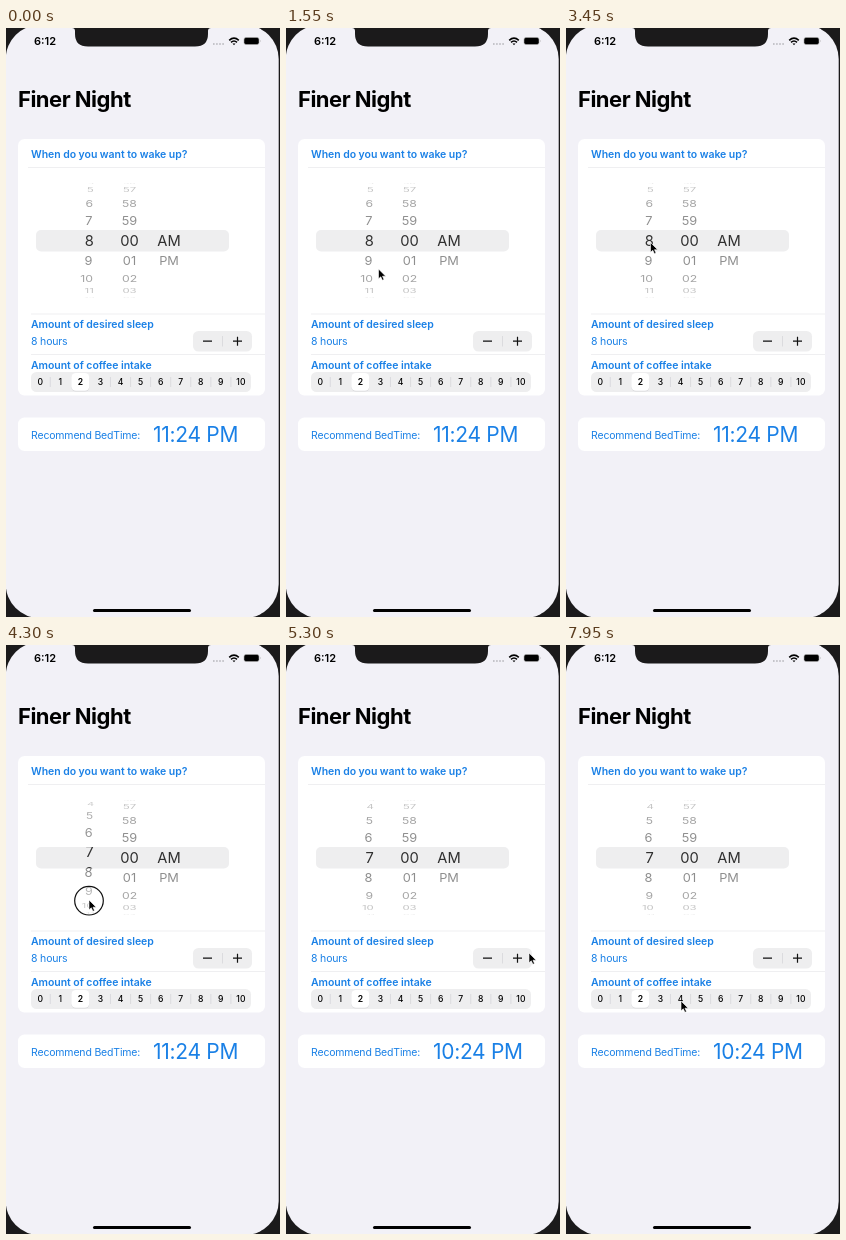
Write an HTML page that moves like this. It is 274 px wide and 589 px high and loops after 8 s.

```html
<!DOCTYPE html>
<html lang="en">
<head>
<meta charset="utf-8">
<title>Bedtime calculator</title>
<style>
html, body { margin: 0; width: 100%; height: 100%; overflow: hidden; background: #1b1a1b; }
svg { display: block; width: 274px; height: 589px; font-family: Inter, "Noto Sans", sans-serif; }
.blue { fill: #1a80e6; font-size: 10.5px; letter-spacing: -.17px; }
.bold { font-weight: 600; letter-spacing: -.05px; }
.time { font-size: 21px; letter-spacing: -.3px; }
.card { fill: #fff; }
.grey { fill: #eeeeef; }
.line { stroke: #ebebee; stroke-width: .8; }
.tick { stroke: #d6d6da; stroke-width: .8; }
</style>
</head>
<body>
<svg viewBox="0 0 274 589">
  <defs>
    <clipPath id="inside"><path d="M30 202H223V223.5H30Z"/></clipPath>
    <clipPath id="outside"><path d="M30 155H223V202H30ZM30 223.5H223V270H30Z"/></clipPath>
  </defs>
  <rect x="-.3" y="-3" width="273" height="593" rx="34" fill="#f2f1f7"/>
  <path d="M66 0Q69 0 69 3V6Q69 18.500 82 18.500H189Q202 18.500 202 6V3Q202 0 205 0Z" fill="#1b1a1b"/>

  <text x="28" y="17" font-size="11" font-weight="600">6:12</text>
  <path d="M207 16h11" stroke="#b5b5ba" stroke-width="1.6" stroke-dasharray="1.6 1.5"/>
  <path d="M223.200 12.300Q228 8 232.800 12.300M225 14.300Q228 11.700 231 14.300" fill="none" stroke="#000" stroke-width="1.6"/>
  <path d="M226.500 15.500h3L228 17.200Z"/>
  <rect x="238" y="9.500" width="15" height="7" rx="2" stroke="#aaa" stroke-width=".6"/>
  <path d="M254 11.700q1.300 1.300 0 2.600Z" fill="#aaa"/>

  <text x="12" y="79" font-size="22" font-weight="700" letter-spacing="-.5">Finer Night</text>

  <rect class="card" x="12" y="111" width="247" height="256.500" rx="6.500"/>
  <path class="line" d="M22 139.500H259M25 286H259M25 326.500H259"/>
  <text class="blue bold" x="25" y="129.500">When do you want to wake up?</text>
  <rect class="grey" x="30" y="202" width="193" height="21.500" rx="5"/>
  <g id="wheel"></g>

  <text class="blue bold" x="25" y="300">Amount of desired sleep</text>
  <text class="blue" x="25" y="317">8 hours</text>
  <rect class="grey" x="187" y="303" width="59" height="20.500" rx="5.500"/>
  <path class="tick" d="M216.500 308v10.500"/>
  <path d="M197 313.200h9M227 313.200h9M231.500 308.700v9" stroke="#111" stroke-width="1.2"/>

  <text class="blue bold" x="25" y="341">Amount of coffee intake</text>
  <rect class="grey" x="25" y="344" width="220" height="20" rx="5.500"/>
  <g id="segments" font-size="8.600" text-anchor="middle"></g>

  <rect class="card" x="12" y="389.500" width="247" height="33.500" rx="6.500"/>
  <text class="blue" x="25" y="410.500">Recommend BedTime:</text>
  <text class="blue time" id="bedtime" x="147" y="414"></text>
  <rect x="87" y="581" width="98" height="3" rx="1.500"/>

  <g id="pointer">
    <circle id="touch" cy=".7" r="14.300" fill="#fff" fill-opacity=".25" stroke="#111" stroke-width="1.200"/>
    <path d="M0 0V9.800L2.300 7.800 3.900 11.300 5.500 10.600 4 7.200H7.200Z" stroke="#fff" stroke-width=".6"/>
  </g>
</svg>
<script>
const $ = id => document.getElementById(id);
const LOOP = 8000, PRESS = 3600, RELEASE = 4300, SNAPPED = 4450;
const CENTER = 212.7, RADIUS = 58.5, ROW_ANGLE = Math.PI / 9, ROW_HEIGHT = 22;

function ease(t, from, to) {
  const p = Math.min(1, Math.max(0, (t - from) / (to - from)));
  return p * p * (3 - 2 * p);
}

// The pointer rests between moves: start, end, x, y
const moves = [
  [750, 1550, 92.5, 241], [2300, 3150, 84.5, 214.5],
  [3480, 3900, 83, 251], [4100, RELEASE, 83, 255],
  [4600, 4950, 263, 392], [5050, 5300, 243, 308],
  [5300, 5800, 228, 315], [6850, 7900, 115, 356]
];

function pointerAt(t) {
  let x = 241, y = 180;
  for (const [start, end, toX, toY] of moves) {
    const p = ease(t, start, end);
    x += (toX - x) * p;
    y += (toY - y) * p;
  }
  return [x, y];
}

// The wheel follows the drag, then snaps to the next row
function hourAt(t, y) {
  const dragged = t < PRESS ? 0 : Math.max(0, (y - 239) / ROW_HEIGHT);
  return 8 - dragged - (1 - dragged) * ease(t, RELEASE, SNAPPED);
}

function column(pos, label, x, anchor, big) {
  const size = big ? 14.7 : 13;
  let out = '';
  for (let i = Math.ceil(pos - 4.4); i <= pos + 4.4; i++) {
    const text = label(i);
    if (!text) continue;
    const angle = (i - pos) * ROW_ANGLE, depth = Math.cos(angle);
    const scale = big ? 1 : .75 + .25 * depth;
    const shift = anchor === 'end' ? (big ? 1.5 : 3 * (1 - depth)) : 0;
    const alpha = big ? .8 : .47 * depth;
    out += `<text transform="translate(${x + shift} ${CENTER + RADIUS * Math.sin(angle)}) scale(${scale} ${scale * depth})"
      y="${size * .364}" font-size="${size}" text-anchor="${anchor}" fill-opacity="${alpha}">${text}</text>`;
  }
  return out;
}

function wheel(hour) {
  const layer = big =>
    column(hour, i => (i + 11) % 12 + 1, 86.3, 'end', big) +
    column(0, i => String((i + 60) % 60).padStart(2, '0'), 123.5, 'middle', big) +
    column(0, i => ['AM', 'PM'][i], 163, 'middle', big);
  return `<g clip-path="url(#outside)">${layer(false)}</g><g clip-path="url(#inside)">${layer(true)}</g>`;
}

function segments(count, selected) {
  let out = '';
  for (let i = 0; i < count; i++) {
    const x = 34.2 + i * 20.07, on = i === selected;
    if (on) out += `<rect x="${x - 9}" y="345.5" width="18" height="18" rx="4.5" fill="#d9d9dc"/>
      <rect x="${x - 9}" y="345" width="18" height="17.8" rx="4.5" fill="#fff"/>`;
    else if (i && i !== selected + 1) out += `<path class="tick" d="M${x - 10} 349v10"/>`;
    out += `<text x="${x}" y="357.2" font-weight="${on ? 600 : 500}">${i}</text>`;
  }
  return out;
}

let shownHour;
function draw() {
  const t = performance.now() % LOOP;
  const [x, y] = pointerAt(t), hour = hourAt(t, y);
  if (hour !== shownHour) $('wheel').innerHTML = wheel(shownHour = hour);
  $('bedtime').textContent = t < 4650 ? '11:24 PM' : '10:24 PM';
  $('pointer').setAttribute('transform', `translate(${x} ${y})`);
  $('pointer').style.display = t < 170 ? 'none' : '';
  $('touch').style.display = t >= PRESS && t < RELEASE + 50 ? '' : 'none';
  requestAnimationFrame(draw);
}

$('segments').innerHTML = segments(11, 2);
draw();
</script>
</body>
</html>
```
